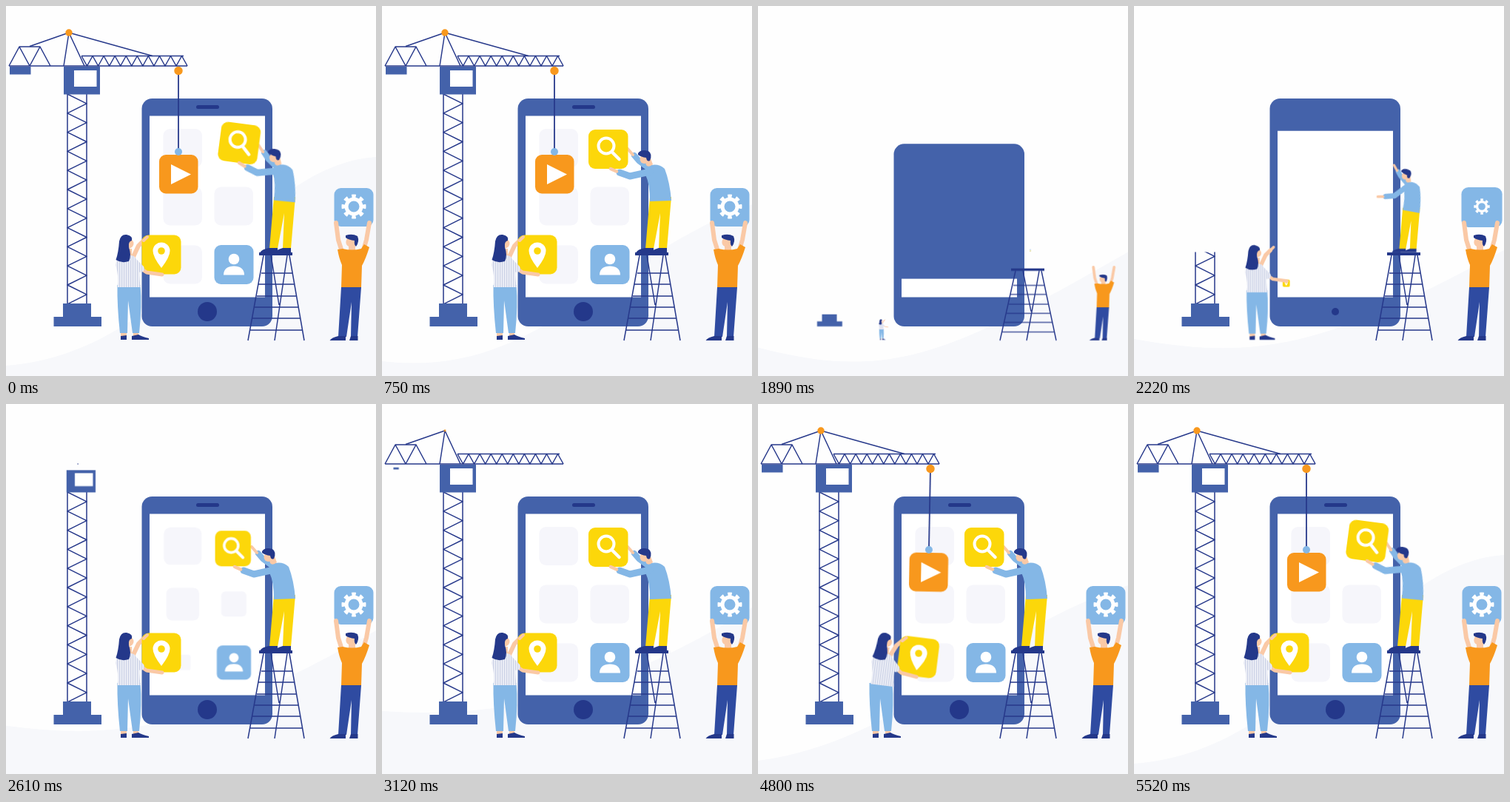
An HTML page for the animation above (5.55 s loop, 500x500 px).

```html
<!DOCTYPE html>
<html lang="en">
<head>
<meta charset="utf-8">
<title>Building an app</title>
<style>
html, body { margin: 0; width: 100%; height: 100%; overflow: hidden; background: #fefefe; }
svg { display: block; width: 100%; height: 100%; }
.navy { fill: #24388a; }
.blue { fill: #4462aa; }
.sky { fill: #84b7e6; }
.sun { fill: #fcd70a; }
.orange { fill: #f8981d; }
.skin { fill: #fac9a6; }
.white { fill: #fff; }
.cell { fill: #f6f6fb; }
.line { fill: none; stroke: #27398b; stroke-width: 1.5; stroke-linejoin: round; }
.limb { fill: none; stroke-linecap: round; stroke-linejoin: round; }
.s-skin { stroke: #fac9a6; }
.s-sky { stroke: #84b7e6; }
.s-white { stroke: #fff; fill: none; }
.draw { stroke-dasharray: 1 2; }
</style>
</head>
<body>
<svg viewBox="0 0 500 500">
  <defs>
    <pattern id="stripes" width="3" height="3" patternUnits="userSpaceOnUse">
      <rect width="3" height="3" fill="#edeff7"/><rect width="1.2" height="3" fill="#ccd2e6"/>
    </pattern>
    <clipPath id="mastClip"><rect id="mastWin" x="80" y="119" width="33" height="284"/></clipPath>
    <clipPath id="jibClip"><rect id="jibWin" x="0" y="50" width="250" height="34"/></clipPath>
  </defs>

  <path id="wave" fill="#f7f8fb"/>

  <!-- phone -->
  <rect id="body" class="blue" x="183.5" y="125" width="176.5" height="308" rx="14"/>
  <rect id="screen" class="white" x="194" y="148.5" width="156" height="245"/>
  <rect id="speaker" class="navy" x="257" y="134" width="31" height="5" rx="2.5"/>
  <circle id="home" class="navy" cx="272" cy="413" r="13"/>
  <rect id="cell1" class="cell" x="212.5" y="166" width="52.5" height="52" rx="9"/>
  <rect id="cell2" class="cell" x="212.5" y="244.5" width="52.5" height="52" rx="9"/>
  <rect id="cell3" class="cell" x="281.5" y="244.5" width="52.5" height="52" rx="9"/>
  <rect id="cell4" class="cell" x="212.5" y="323.5" width="52.5" height="52" rx="9"/>
  <g id="user">
    <rect class="sky" x="281.5" y="323" width="53" height="53" rx="9"/>
    <circle class="white" cx="308" cy="342" r="7.3"/>
    <path class="white" d="M294 363.500C294 355 300 351.500 308 351.500S322 355 322 363.500Z"/>
  </g>

  <!-- crane -->
  <g clip-path="url(#mastClip)">
    <path class="line" d="M83 119V403M109 119V403"/>
    <path id="mast" class="line"/>
  </g>
  <g id="base" class="blue">
    <rect x="77" y="402" width="38" height="19"/><rect x="64.500" y="420" width="64.500" height="13"/>
  </g>
  <g id="cab">
    <rect class="blue" x="78" y="82" width="49" height="37.500"/><rect class="white" x="92" y="87" width="30.500" height="22"/>
  </g>
  <g clip-path="url(#jibClip)">
    <path class="line" d="M4 81H245M4 81L18 55L32 81L46 55L60 81M18 55H46M102 67.500H240"/>
    <path id="jib" class="line"/>
  </g>
  <path id="frame" class="line draw" pathLength="1" d="M78 81L85 36L106 81"/>
  <path id="stayL" class="line draw" pathLength="1" d="M85 36L32 54.500"/>
  <path id="stayR" class="line draw" pathLength="1" d="M85 36L198 67.500"/>
  <circle id="apex" class="orange" cx="85" cy="36" r="4.700"/>
  <rect id="weight" class="blue" x="5" y="82" width="28.500" height="10.500"/>
  <g id="swing">
    <path id="cable" class="line draw" pathLength="1" d="M233 88V194" style="stroke-width:1.800"/>
    <g id="play">
      <rect class="orange" x="207" y="201" width="52.500" height="52.500" rx="9"/>
      <path class="white" d="M223 214L250 227.500L223 241Z"/>
    </g>
    <circle id="link" class="sky" cx="233" cy="197" r="5"/>
  </g>
  <circle id="hook" class="orange" cx="233" cy="87.500" r="5.700"/>

  <!-- ladder -->
  <g id="ladder">
    <path class="line" d="M348 337L327 452M380 337L363 452M383 337L403 452M358 337L369 404M345 361H387M341 376H390M339 392H393M336 407H395M333 422H398M330 438H401"/>
    <rect class="navy" x="342" y="333" width="45" height="4"/>
  </g>

  <!-- man on the ladder -->
  <g id="climber">
    <path class="sun" d="M362 258H391L385 328H374L376 280L367 328H356Z"/>
    <path class="navy" d="M343.500 333Q345 329 355 327H367V333ZM364 333Q366 329 374 327H385V333Z"/>
    <g id="climberTop">
      <path class="limb s-sky" stroke-width="8" d="M363 221L347 209L341 202"/>
      <path class="limb s-skin" stroke-width="4" d="M339 201L332 193"/>
      <path class="sky" d="M358 217Q372 211 382 220Q389 238 391 263L362 264Q362 240 356 228Z"/>
      <path class="skin" d="M355 207L363 206L366 214Q360 219 357 215Z"/>
      <circle class="skin" cx="354.500" cy="207" r="6"/>
      <path class="navy" d="M346 199Q350 193 360 196Q366 200 362 209Q358 211 357 205Q350 204 346 201Z"/>
      <g id="find">
        <rect class="sun" x="279" y="167" width="53.500" height="53" rx="9"/>
        <circle class="s-white" cx="303" cy="189" r="10.500" stroke-width="4"/>
        <path class="limb s-white" stroke-width="4.500" d="M311.500 198L320.500 207"/>
      </g>
      <g id="reach">
        <path class="limb s-sky" stroke-width="9" d="M362 224L335 230L321 225"/>
        <path class="limb s-skin" stroke-width="4.500" d="M317 223.500L309 220"/>
      </g>
    </g>
  </g>

  <!-- woman -->
  <g id="woman">
    <path class="skin" d="M155 438H163V447H155ZM172 438H179V447H172Z"/>
    <path class="sky" d="M150.500 377H181.500Q184 405 180 442H171L165 398L164 442H154Q150 405 150.500 377Z"/>
    <path class="navy" d="M155 451V446L163 445V451ZM170 451V446L179 444Q184 447 193 449V451Z"/>
    <g id="womanTop">
      <path class="limb s-skin" stroke-width="6" d="M171 341L179 324L186 317"/>
      <g id="pin">
        <rect class="sun" x="183.500" y="309.500" width="53" height="53" rx="9"/>
        <path class="white" d="M210 354Q198.500 339 198.500 331A11.500 11.500 0 0 1 221.500 331Q221.500 339 210 354Z"/>
        <circle class="sun" cx="210" cy="331" r="4.800"/>
      </g>
      <path class="limb s-skin" stroke-width="4" d="M186 317L191 312"/>
      <path class="skin" d="M160 328H170V342H160Z"/>
      <path fill="url(#stripes)" d="M150 341Q160 334 173 338L181 349Q179 364 182 380H150.500Q153 365 148 350Z"/>
      <path class="limb s-skin" stroke-width="5" d="M178 352L190 360L211 363"/>
      <path class="limb" stroke="url(#stripes)" stroke-width="10" d="M172 345L182 355"/>
      <circle class="skin" cx="166" cy="321" r="6.500"/>
      <path class="navy" d="M153 318Q155 308 163 309Q172 311 170 317Q165 318 166 326Q170 337 166 345Q156 348 148.500 343Q152 333 153 318Z"/>
    </g>
  </g>

  <!-- man with the gear -->
  <g id="lifter">
    <g id="gearTile">
      <rect class="sky" x="443.500" y="246" width="53" height="52" rx="9"/>
      <g id="gear">
        <circle class="s-white" cx="470" cy="271" r="10" stroke-width="5"/>
        <circle class="s-white" cx="470" cy="271" r="14" stroke-width="5" pathLength="16" stroke-dasharray="1 1" stroke-dashoffset=".5"/>
      </g>
    </g>
    <path class="limb s-skin" stroke-width="6" d="M455 335L449 316L446 293M482 333L487 316L491 293"/>
    <path class="skin" d="M463 318H472V333H463Z"/>
    <path class="orange" d="M448 329L455 328Q468 331 480 328L484 322L491 326Q486 342 481 351L480 381H453L454 350Q450 341 448 329Z"/>
    <circle class="skin" cx="466" cy="319" r="6.700"/>
    <path class="navy" d="M459 310Q468 307 475 311Q478 318 473 325Q470 322 471 317Q463 316 459 313Z"/>
    <path fill="#2f4ba1" d="M453 380H480L475 447H466L467 400L460 447H449Z"/>
    <path class="navy" d="M437.500 452Q440 448 449 446H459V452ZM464 452L466 446H475.500V452Z"/>
  </g>
</svg>

<script>
const LOOP = 5550, CUT = 1440;
const $ = id => document.getElementById(id);
let css = '';

// keys: [ms, declarations] pairs
function animate(id, keys, ease = 'ease-in-out', origin = [0, 0]) {
  const body = keys.map(([t, decl]) => `${(t / LOOP * 100).toFixed(3)}%{${decl}}`).join('');
  css += `@keyframes ${id}{${body}}#${id}{animation:${id} ${LOOP}ms ${ease} infinite;` +
    `transform-origin:${origin[0]}px ${origin[1]}px}\n`;
}

// full until the cut, then absent, then built through the steps
function build(id, full, none, start, steps, ease, origin) {
  animate(id, [[0, full], [CUT - 1, full], [CUT, none], [start, none], ...steps, [LOOP, full]], ease, origin);
}

const scale = s => `transform:scale(${s})`;
const turn = a => `transform:rotate(${a}deg)`;

function pop(id, start, end, x, y, mid = []) {
  build(id, scale(1), scale(0), start, [...mid.map(([t, s]) => [t, scale(s)]), [end, scale(1)]],
    mid.length ? 'linear' : 'ease-out', [x, y]);
}

function draw(id, start, end) {
  const at = n => `stroke-dashoffset:${n}`;
  build(id, at(0), at(1.02), start, [[end, at(0)]]);
}

function rise(id, bottom, height, start, steps) {
  const at = h => `y:${bottom - h}px;height:${h}px`;
  build(id, at(height), at(0), start, steps.map(([t, h]) => [t, at(h)]), 'linear');
}

function zigzag(n, point) {
  return 'M' + Array.from({ length: n + 1 }, (_, i) => point(i)).join('L');
}
$('mast').setAttribute('d', zigzag(22, i => [i % 2 ? 109 : 83, 119 + i * 12.9]));
$('jib').setAttribute('d', zigzag(19, i => [102 + i * 7.53, i % 2 ? 81 : 67.5]));

// background hill: left height, two handles, right height
const hill = (l, a, b, c, d, r) => `d:path("M0 ${l}C${a} ${b} ${c} ${d} 500 ${r}V500H0Z")`;
const high = hill(486, 230, 470, 330, 215, 204);
animate('wave', [
  [0, high],
  [1530, hill(474, 190, 540, 260, 480, 335)],
  [2220, hill(450, 170, 480, 260, 460, 330)],
  [3120, hill(415, 150, 425, 300, 400, 275)],
  [3810, hill(440, 200, 420, 300, 330, 262)],
  [4800, hill(482, 200, 455, 300, 310, 245)],
  [5250, high], [LOOP, high]
], 'linear');

rise('body', 433, 308, CUT, [[1530, 43.5], [2000, 308]]);
rise('screen', 393.5, 245, 1850, [[2220, 224.5], [2300, 245]]);
rise('mastWin', 403, 284, 1980, [[2220, 70], [2600, 284]]);
pop('speaker', 2300, 2500, 272.5, 136.5);
pop('home', 2120, 2400, 272, 413, [[2220, .38]]);
[[239, 192], [239, 270], [308, 270], [239, 349]].forEach(([x, y], i) =>
  pop('cell' + (i + 1), 2350 + i * 60, 2650 + i * 60, x, y));
pop('user', 2400, 2700, 308, 349);

pop('base', 1800, 2050, 97, 433);
pop('cab', 2500, 2680, 97, 119);
build('jibWin', 'x:0px;width:250px', 'x:97px;width:0px', 2600, [[2840, 'x:0px;width:250px']]);
draw('frame', 2860, 3080);
draw('stayL', 2920, 3120);
draw('stayR', 3130, 3350);
pop('apex', 3090, 3250, 85, 36);
pop('weight', 3060, 3300, 19, 87, [[3120, .25]]);
pop('hook', 3380, 3550, 233, 87.5);
draw('cable', 3550, 3800);
pop('link', 3820, 3980, 233, 197);
pop('play', 3920, 4200, 233, 201);
animate('swing', [[0, turn(0)], [4150, turn(0)], [4400, turn(-1.6)], [4780, turn(1.1)],
  [5080, turn(-.6)], [5350, turn(0)], [LOOP, turn(0)]], 'ease-in-out', [233, 88]);

build('ladder', 'transform:scaleY(1)', 'transform:scaleY(0)', 1700, [[2000, 'transform:scaleY(1)']], 'ease-out', [365, 452]);

pop('climber', 1880, 2450, 368, 332, [[2220, .8]]);
animate('climberTop', [[0, turn(7.5)], [60, turn(7.5)], [560, turn(0)], [CUT, turn(0)], [CUT + 1, turn(12)],
  [2220, turn(12)], [2600, turn(0)], [3600, turn(0)], [4100, turn(7.5)], [4700, turn(0)],
  [4950, turn(0)], [5450, turn(7.5)], [LOOP, turn(7.5)]], 'ease-in-out', [373, 262]);
build('reach', turn(0), turn(-36), 2220, [[2550, turn(0)]], 'ease-in-out', [360, 224]);
pop('find', 2350, 2700, 316, 212);

pop('woman', 1800, 2350, 167, 451, [[2220, .9]]);
animate('womanTop', [[0, turn(0)], [3430, turn(0)], [3780, turn(7)], [4920, turn(7)],
  [5420, turn(0)], [LOOP, turn(0)]], 'ease-in-out', [165, 392]);
pop('pin', 2160, 2520, 210, 374, [[2220, .2]]);

pop('lifter', 1740, 2080, 465, 452);
pop('gearTile', 1950, 2330, 470, 272, [[2180, 1.04], [2240, 1.04]]);
pop('gear', 2100, 2420, 470, 271, [[2220, .62]]);

const sheet = document.createElement('style');
sheet.textContent = css;
document.head.append(sheet);
</script>
</body>
</html>
```
